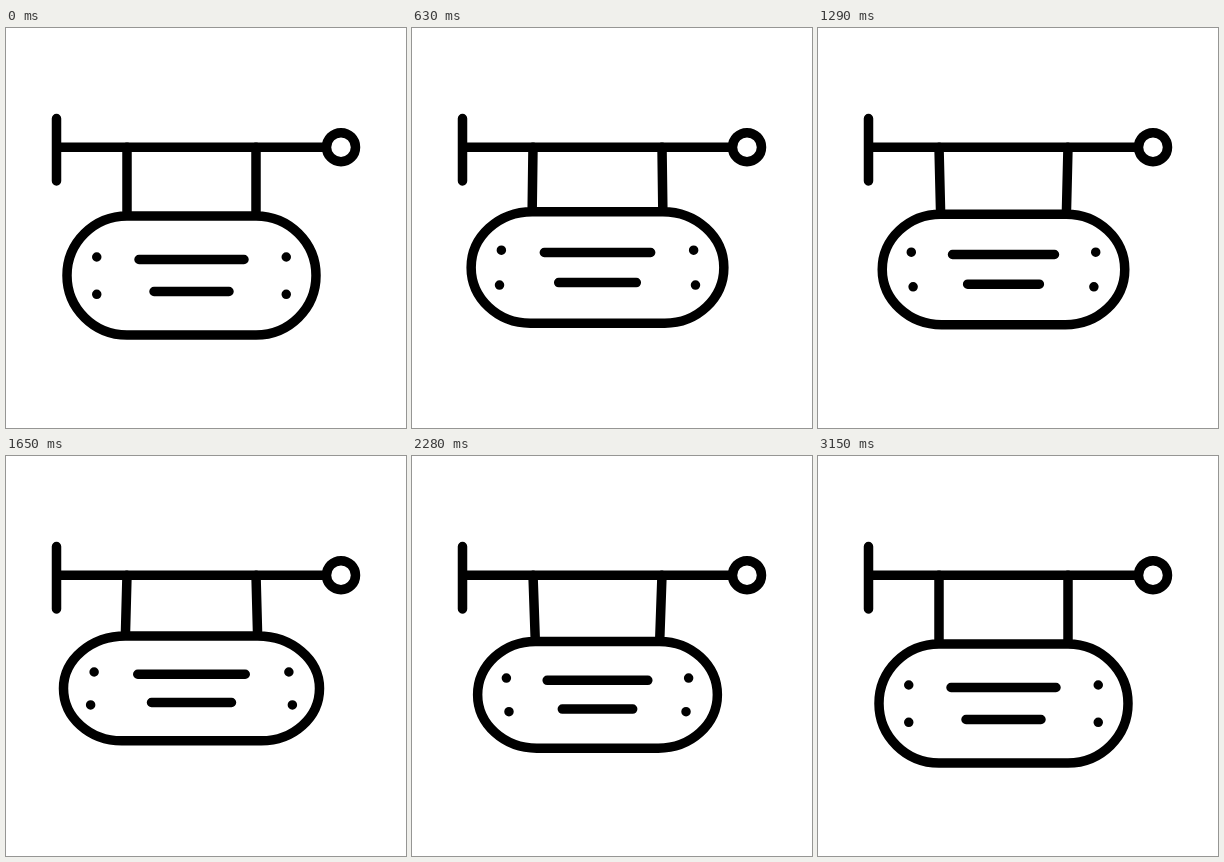
An HTML page that plays this animation: 400x400 px, repeating every 3180 ms.

```html
<!DOCTYPE html>
<html lang="en">
<head>
<meta charset="utf-8">
<title>Swinging sign</title>
<style>
  html, body { margin: 0; height: 100%; overflow: hidden; background: #fff; }
  svg { display: block; width: 100vw; height: 100vh; }
</style>
</head>
<body>
<svg viewBox="0 0 400 400" fill="none" stroke="#000" stroke-width="9.5" stroke-linecap="round" stroke-linejoin="round">
  <path d="M50.5 90.5V153M50.5 119.2H320"/>
  <circle cx="335" cy="119.2" r="14.5"/>
  <path id="sign"/>
</svg>
<script>
const LOOP = 3180, STEP = 30, CX = 185.5, BAR = 119.2;
const sign = document.getElementById('sign');

// [time, tilt]: 1 is fully forward, -1 fully back
const swing = [[0, 0], [420, 1.015], [930, -1.02], [1800, .63], [2250, -.59], [2700, .25], [3150, 0], [LOOP, 0]];

// Each row is [y, half width] at rest, forward and back
const parts = {
  top: [[188, 64.5], [172, 67.75], [183.5, 60.5]],
  bottom: [[307, 64.5], [262.5, 75], [281.5, 58]],
  upperDots: [[229, 94.75], [203, 100], [217, 88.5]],
  lowerDots: [[266.3, 94.75], [231.5, 107], [248, 84]],
  upperLine: [[231.5, 52.5], [205, 55], [219.2, 48.75]],
  lowerLine: [[263.5, 37.5], [229.5, 42.5], [245.5, 33.5]]
};
const sides = [[0, 124.5], [0, 131.5], [0, 116.5]];

const mix = (a, b, u) => a + (b - a) * u;

function tiltAt(t) {
  const i = swing.findIndex(([time]) => time > t);
  const [t0, a] = swing[i - 1], [t1, b] = swing[i];
  const u = (t - t0) / (t1 - t0);
  return mix(a, b, u * u * (3 - 2 * u));
}

function pose([rest, forward, back], tilt) {
  const end = tilt > 0 ? forward : back;
  return rest.map((v, i) => mix(v, end[i], Math.abs(tilt)));
}

const line = ([y, w]) => `M${CX - w} ${y}H${CX + w}`;
const dots = ([y, w]) => `M${CX - w} ${y}h.01M${CX + w} ${y}h.01`;

function board([y0, w0], [y1, w1], w) {
  const mid = (y0 + y1) / 2, k = .552;
  const side = s => {
    const x = CX + s * w, a = CX + s * w0, b = CX + s * w1;
    return `M${CX} ${y0}H${a}C${mix(a, x, k)} ${y0} ${x} ${mix(mid, y0, k)} ${x} ${mid}` +
      `C${x} ${mix(mid, y1, k)} ${mix(b, x, k)} ${y1} ${b} ${y1}H${CX}`;
  };
  return side(-1) + side(1);
}

function draw(t) {
  const tilt = tiltAt(t), p = {};
  for (const name in parts) p[name] = pose(parts[name], tilt);
  const [y, w] = p.top, rest = parts.top[0][1];
  const ropes = [-1, 1].map(s => `M${CX + s * rest} ${BAR}L${CX + s * w} ${y}`).join('');
  sign.setAttribute('d', ropes + board(p.top, p.bottom, pose(sides, tilt)[1]) +
    dots(p.upperDots) + dots(p.lowerDots) + line(p.upperLine) + line(p.lowerLine));
}

const start = performance.now();
function tick() {
  const t = (performance.now() - start) % LOOP;
  draw(Math.floor(t / STEP) * STEP);
  requestAnimationFrame(tick);
}
tick();
</script>
</body>
</html>
```
